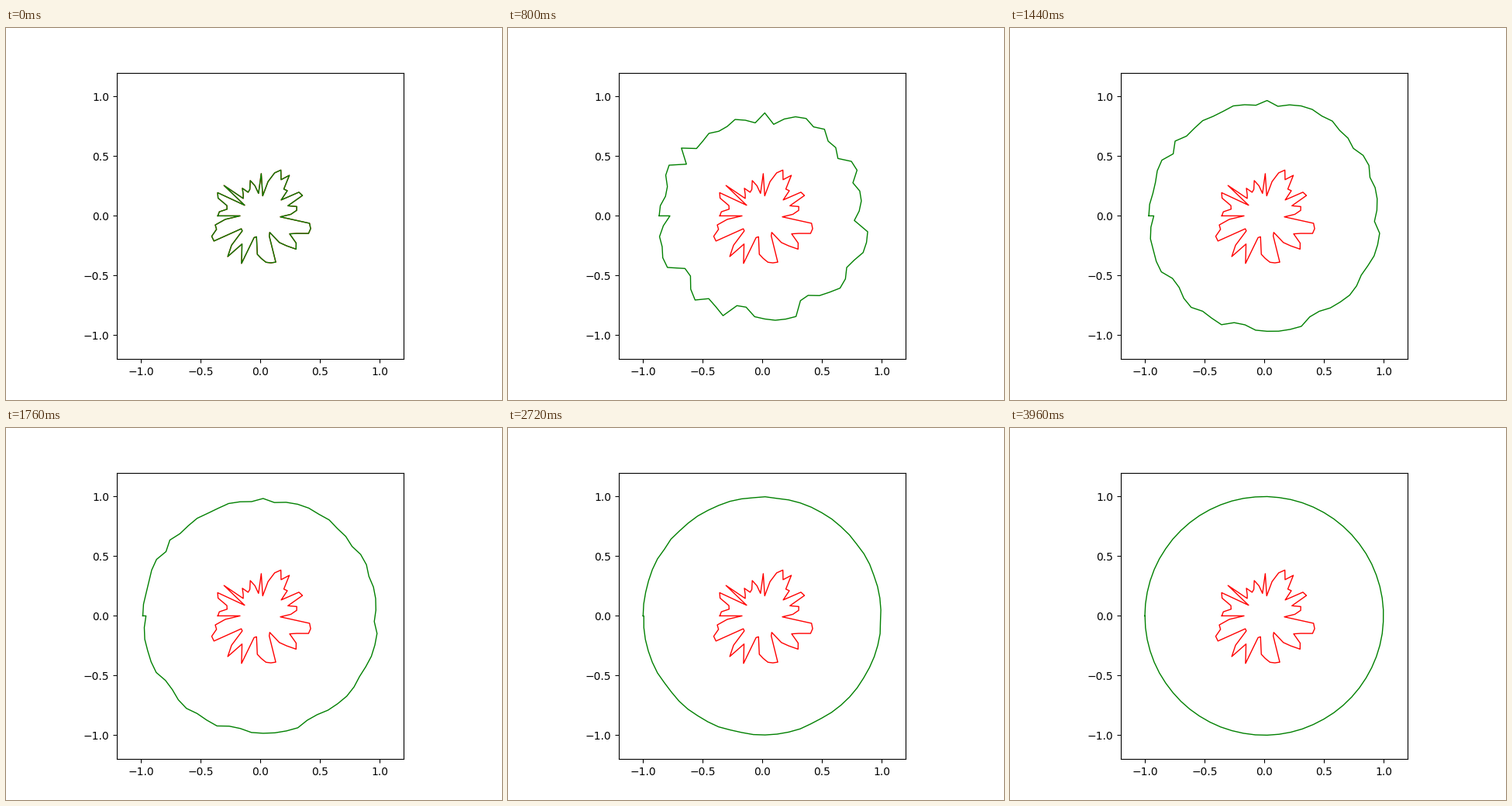
A matplotlib script that plays this animation: 640 px wide and 480 px high, repeating every 4000 ms.

```python
import numpy as np
import matplotlib.pyplot as plt
from matplotlib.animation import FuncAnimation

FRAMES = 100
INTERVAL = 40

# Starting radii in thousandths, clockwise from the left side.
START = np.array([
    355, 344, 283, 292, 383, 406, 158, 396, 204, 228, 275, 222, 238, 307, 257, 189,
    354, 169, 294, 380, 421, 350, 418, 299, 310, 221, 380, 393, 247, 316, 309, 257,
    169, 418, 436, 431, 339, 289, 378, 410, 335, 275, 160, 184, 409, 404, 392, 357,
    323, 178, 189, 428, 337, 281, 436, 344, 196, 192, 441, 441, 383, 384, 294, 169,
]) / 1000
ANGLES = np.linspace(np.pi, -np.pi, len(START))


def closed_curve(radii):
    x, y = radii * np.cos(ANGLES), radii * np.sin(ANGLES)
    return np.append(x, x[0]), np.append(y, y[0])


def radii_at(step):
    """Radii relaxing towards the unit circle, the longer ones faster."""
    lead = START - 0.17
    rate = 0.0695 + 0.07 * lead + 0.2 * lead**2
    lag = (0.095 + 0.8 * lead) * (1 - np.exp(-step / 6))
    return 1 - (1 - START) * np.exp(lag - rate * step)


fig, ax = plt.subplots(figsize=(6.4, 4.8), dpi=100)
ax.set_aspect("equal")
ax.set_xlim(-1.2, 1.2)
ax.set_ylim(-1.2, 1.2)
ticks = np.arange(-1, 1.1, 0.5)
ax.set_xticks(ticks)
ax.set_yticks(ticks)

ax.plot(*closed_curve(START), color="red", lw=1)
moving, = ax.plot(*closed_curve(START), color="green", lw=1)


def update(step):
    moving.set_data(*closed_curve(radii_at(step)))
    return moving,


anim = FuncAnimation(fig, update, frames=FRAMES, interval=INTERVAL,
                     repeat=True, repeat_delay=0)
plt.show()
```
